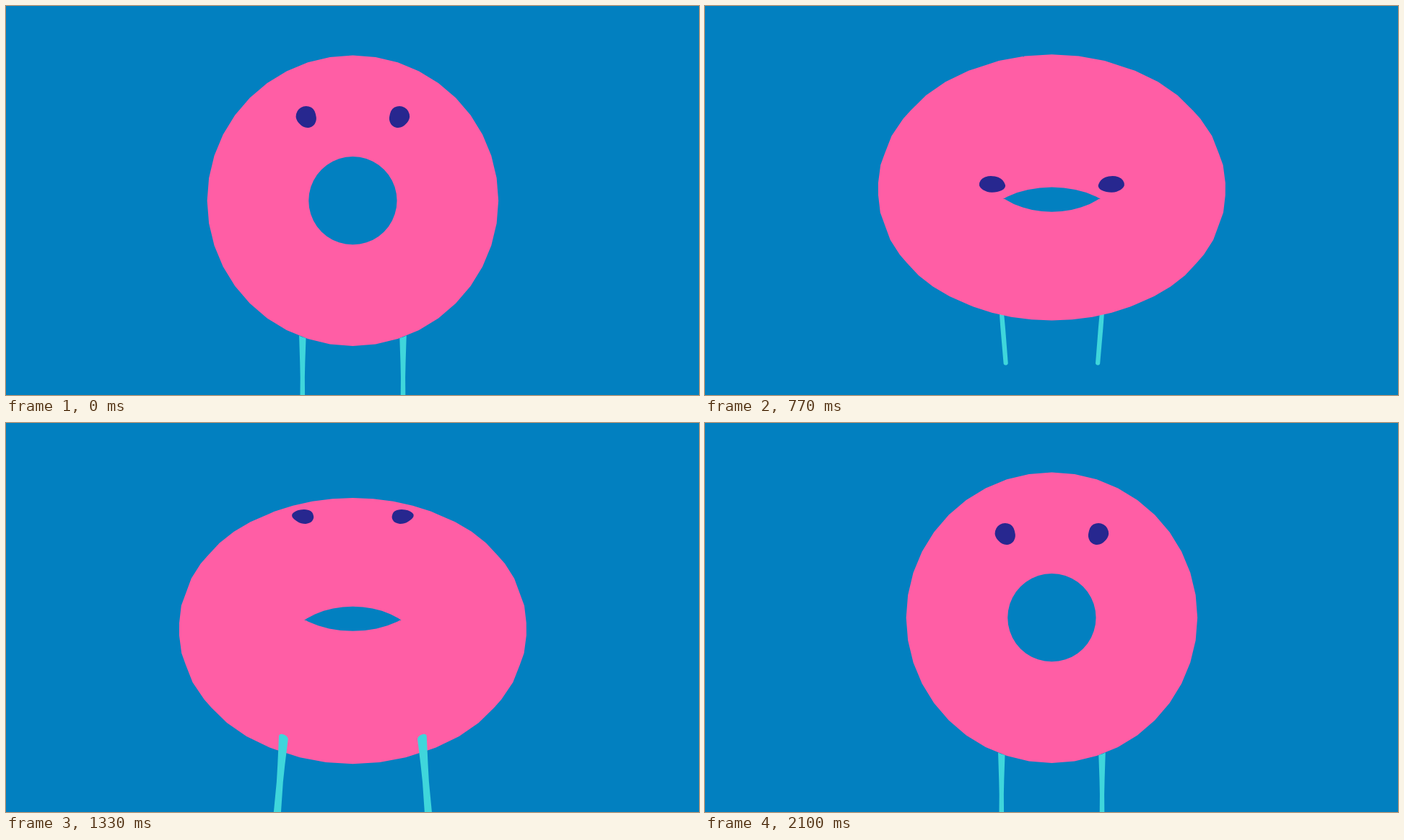
An HTML page with a canvas that plays this animation: 960x540 px, repeating every 2.45 s.

```html
<!DOCTYPE html>
<html lang="en">
<head>
<meta charset="utf-8">
<title>Donut flip</title>
<style>
  html, body { margin: 0; width: 100%; height: 100%; overflow: hidden; background: #0280c0; }
  canvas { display: block; width: 960px; height: 540px; }
</style>
</head>
<body>
<canvas id="stage" width="960" height="540"></canvas>
<script>
const ctx = document.getElementById('stage').getContext('2d');
const COLORS = { sky: '#0280c0', dough: '#ff5ea5', eye: '#27278f', leg: '#3fd6db' };

const STEP = 70, LAST = 30, LOOP = 2450;
const CENTER = [480.4, 270.2], FOCAL = 1200;
const RING = 155, TUBE = 82.7, RING_SEGS = 40, TUBE_SEGS = 24;
const EYE = { x: 72.1, y: 129.4, scale: 0.945 };
const LEG_X = 82.3, LEG_SEGS = 16;

// Outline of the left eye around its middle
const EYE_SHAPE = [
  [-17, 0], [-15, -9], [-8.5, -16], [0, -18], [9, -16], [14.5, -9.5], [16.5, -1], [17, 4],
  [14.5, 11.5], [9, 16.3], [2, 18], [-5, 16.3], [-10, 12], [-14.5, 7]
];
// Distance below the donut's middle and radius; the first ring sits on the dough
const LEG_SHAPE = [[0, 5.6], [265, 4.2], [290, 3.65], [335, 4], [455, 4]];

const TAU = Math.PI * 2;
const clamp = t => Math.min(1, Math.max(0, t));
const easeSine = t => (1 - Math.cos(Math.PI * clamp(t))) / 2;

let sin = 0, cos = 1, distance = FOCAL;

function project([x, y, z]) {
  const k = FOCAL / (distance - y * sin - z * cos);
  return [CENTER[0] + x * k, CENTER[1] - (y * cos - z * sin) * k];
}

function addFace(path, pts) {
  let area = 0;
  pts.forEach((p, i) => {
    const q = pts[(i + 1) % pts.length];
    area += p[0] * q[1] - q[0] * p[1];
  });
  if (area <= 0) return; // faces away
  pts.forEach((p, i) => i ? path.lineTo(p[0], p[1]) : path.moveTo(p[0], p[1]));
  path.closePath();
}

function drawDonut() {
  const grid = [];
  for (let i = 0; i < RING_SEGS; i++) {
    const u = i / RING_SEGS * TAU;
    grid.push(Array.from({ length: TUBE_SEGS }, (_, j) => {
      const v = j / TUBE_SEGS * TAU, rho = RING + TUBE * Math.cos(v);
      return project([rho * Math.sin(u), rho * Math.cos(u), TUBE * Math.sin(v)]);
    }));
  }
  const path = new Path2D();
  grid.forEach((row, i) => {
    const next = grid[(i + 1) % RING_SEGS];
    row.forEach((p, j) => {
      const k = (j + 1) % TUBE_SEGS;
      addFace(path, [p, next[j], next[k], row[k]]);
    });
  });
  ctx.fillStyle = COLORS.dough;
  ctx.fill(path);
}

function drawEye(side) {
  const pts = EYE_SHAPE.map(([dx, dy]) => {
    const x = side * (EYE.x - dx * EYE.scale), y = EYE.y - dy * EYE.scale;
    const off = Math.hypot(x, y) - RING;
    return project([x, y, Math.sqrt(TUBE * TUBE - off * off) + 1]);
  });
  const mid = i => {
    const p = pts[i % pts.length], q = pts[(i + 1) % pts.length];
    return [(p[0] + q[0]) / 2, (p[1] + q[1]) / 2];
  };
  ctx.fillStyle = COLORS.eye;
  ctx.beginPath();
  ctx.moveTo(...mid(pts.length - 1));
  pts.forEach((p, i) => ctx.quadraticCurveTo(...p, ...mid(i)));
  ctx.fill();
}

function doughBottom(x, z) {
  const rho = RING + Math.sqrt(TUBE * TUBE - z * z);
  return -Math.sqrt(rho * rho - x * x);
}

function drawLeg(side) {
  const rings = LEG_SHAPE.map(([drop, radius]) =>
    Array.from({ length: LEG_SEGS }, (_, i) => {
      const a = i / LEG_SEGS * TAU;
      const x = side * LEG_X + radius * Math.cos(a), z = radius * Math.sin(a);
      return project([x, drop ? -drop : doughBottom(x, z), z]);
    }));
  const path = new Path2D();
  for (let l = 1; l < rings.length; l++) {
    const top = rings[l - 1], low = rings[l];
    for (let i = 0; i < LEG_SEGS; i++) {
      const k = (i + 1) % LEG_SEGS;
      addFace(path, [top[i], low[i], low[k], top[k]]);
    }
  }
  addFace(path, rings[rings.length - 1].slice().reverse());
  ctx.fillStyle = COLORS.leg;
  ctx.fill(path);
}

const both = draw => { draw(-1); draw(1); };

function render(step) {
  const angle = TAU * easeSine((step - 7.2) / 15.6);
  const zoom = easeSine(step / 7) - easeSine((step - 23) / 7);
  sin = Math.sin(angle);
  cos = Math.cos(angle);
  distance = FOCAL / (0.846 + 0.154 * zoom);

  const legsInFront = -sin * distance > 223;
  const eyeDepth = EYE.y * sin + TUBE * cos, eyeHeight = EYE.y * cos - TUBE * sin;
  const eyesVisible = sin * eyeHeight + cos * (distance - eyeDepth) > 0;

  ctx.fillStyle = COLORS.sky;
  ctx.fillRect(0, 0, 960, 540);
  if (!legsInFront) both(drawLeg);
  drawDonut();
  if (eyesVisible) both(drawEye);
  if (legsInFront) both(drawLeg);
}

let shown = -1;
const start = performance.now();
function tick() {
  const time = (performance.now() - start) % LOOP;
  const step = Math.min(LAST, Math.floor(time / STEP));
  if (step !== shown) render(shown = step);
  requestAnimationFrame(tick);
}
tick();
</script>
</body>
</html>
```
